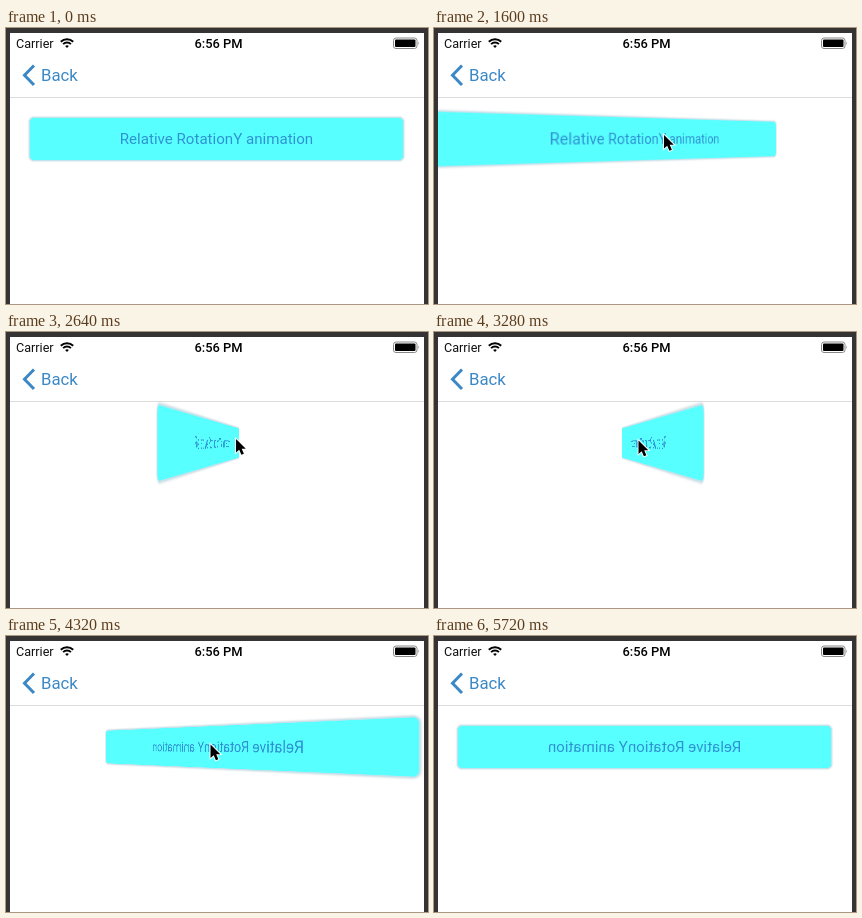
Animation, 422 px wide and 276 px high, one loop 6.04 s. Source, as an HTML page:

```html
<!DOCTYPE html>
<html lang="en">
<head>
<meta charset="utf-8">
<title>Relative rotation</title>
<style>
html, body { margin: 0; width: 100%; height: 100%; overflow: hidden; background: #353334; }
body { position: relative; font-family: Roboto, Inter, sans-serif; }
svg { position: absolute; left: 0; top: 0; }
#screen { position: absolute; left: 4px; top: 5px; width: 414px; height: 271px; background: #fff; overflow: hidden; }
#button {
  position: absolute; left: 19px; top: 84px; width: 375px; height: 44px; box-sizing: border-box;
  border: 1px solid #c3e3ec; border-radius: 5px; background: #58ffff; box-shadow: 0 0 2px #b4c4cc;
  color: #2f93d2; font-size: 15.1px; line-height: 42px; text-align: center; white-space: nowrap;
}
</style>
</head>
<body>
<div id="screen"><div id="button">Relative RotationY animation</div></div>
<svg width="422" height="276">
  <text x="10" y="20" font-size="12.6" fill="#111">Carrier</text>
  <g fill="none" stroke="#000" stroke-width="2">
    <path d="M54.8 13.8A8.8 8.8 0 0 1 67.2 13.8M57.1 16.1A5.5 5.5 0 0 1 64.9 16.1"/>
    <path d="M61 20L59.1 18.1A2.7 2.7 0 0 1 62.9 18.1Z" fill="#000" stroke="none"/>
  </g>
  <text x="212.5" y="20" font-size="12.9" font-weight="500" text-anchor="middle">6:56 PM</text>
  <rect x="387.5" y="10" width="23.5" height="10.5" rx="2.5" fill="none" stroke="#888"/>
  <rect x="389" y="11.5" width="20.5" height="7.5" rx="1"/>
  <path d="M412 13.5q1.6 1.7 0 3.5z" fill="#888"/>
  <path d="M28 37.5L18.5 47.2L28 57" fill="none" stroke="#3b88c6" stroke-width="3"/>
  <text x="35" y="53" font-size="16.8" fill="#3b88c6">Back</text>
  <path d="M4 69.5H418" stroke="#dcdcdc"/>
  <g id="cursor">
    <circle id="ring" cy="1.5" r="21.5" fill="none" stroke="#111" stroke-width="1.5"/>
    <path d="M0 0V13.5L3.2 10.7L5.4 15.8L7.9 14.7L5.7 9.7H9.8Z" stroke="#fff" stroke-width="1.8" paint-order="stroke"/>
  </g>
</svg>
<script>
const LOOP = 6040, STEP = 40, TURN = 250, ANGLE = 20;
// [press, start of turn]
const clicks = [[880, 1012], [1360, 1474], [1820, 1936], [2270, 2390], [2830, 2950],
                [3380, 3505], [4000, 4066], [4480, 4625], [5040, 5185]];
const $ = id => document.getElementById(id);
const progress = (t, start, length) => Math.min(1, Math.max(0, (t - start) / length));
const mix = (a, b, k) => a + (b - a) * k;

function cursorAt(t) {
  if (t < 1000) {
    const k = 1 - (1 - progress(t, 40, 600)) ** 2;
    return [mix(222, 230, k), mix(240, 107, k)];
  }
  if (t < 5440) {
    const k = progress(t, 2640, 180);
    return [mix(230, 204.5, k), mix(107, 108.5, k)];
  }
  const k = (t - 5440) / 200;
  return [mix(204.5, 218, k), mix(108.5, 238, k)];
}

function draw(now) {
  const t = Math.floor(now % LOOP / STEP) * STEP;
  const angle = clicks.reduce((sum, [, start]) => sum + ANGLE * progress(t, start, TURN), 0);
  $('button').style.transform = `perspective(407px) rotateY(${angle}deg)`;
  const [x, y] = cursorAt(t);
  $('cursor').setAttribute('transform', `translate(${x} ${y})`);
  $('cursor').style.display = t >= 40 && t < 5720 ? '' : 'none';
  const pressed = clicks.some(([press, start]) => t >= press && t < start + 20);
  $('ring').style.display = pressed ? '' : 'none';
}

const origin = performance.now();
(function tick() {
  draw(performance.now() - origin);
  requestAnimationFrame(tick);
})();
</script>
</body>
</html>
```
